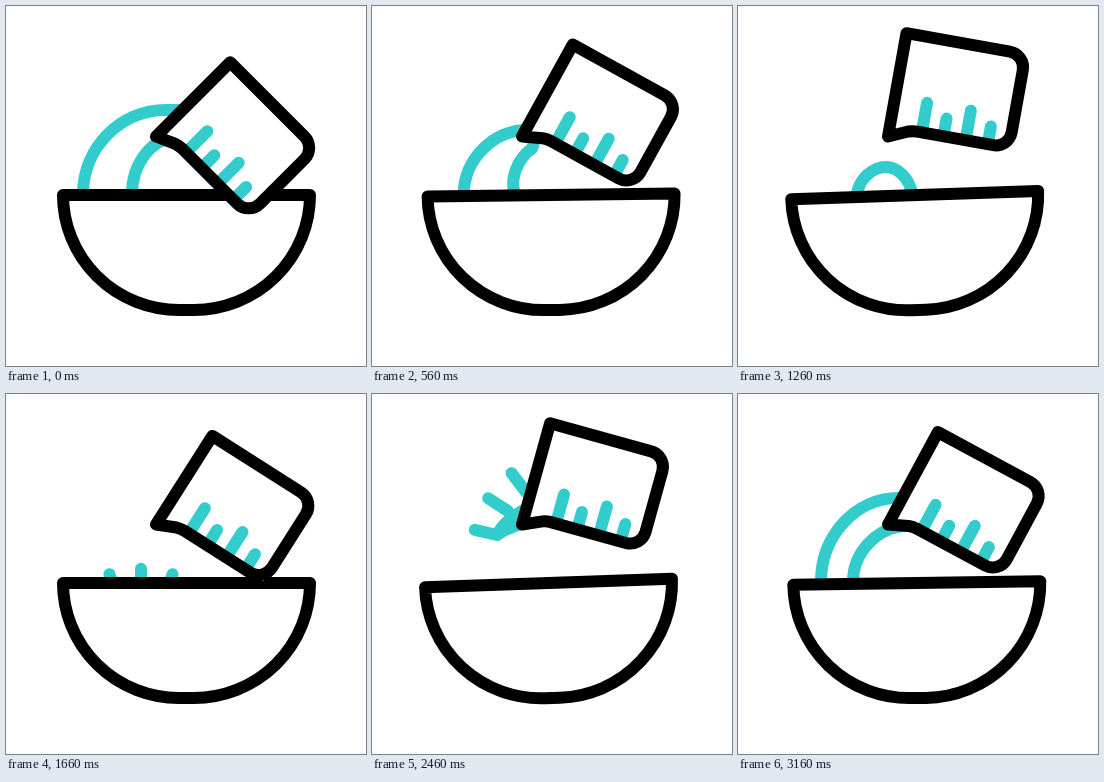
Recreate the animation shown at these times as an HTML page. Size 360x360 px, loop 3180 ms.

```html
<!DOCTYPE html>
<html lang="en">
<head>
<meta charset="utf-8">
<title>Pouring into a bowl</title>
<style>
  html, body { margin: 0; height: 100%; overflow: hidden; background: #fff; }
  svg { display: block; width: 100vw; height: 100vh; }
  path { fill: none; stroke-width: 12; stroke-linecap: round; stroke-linejoin: round; }
  .teal { stroke: #33cccc; }
  .ink { stroke: #000; }
  .solid { fill: #fff; }
</style>
</head>
<body>
<svg viewBox="0 0 360 360">
  <path id="fan" class="teal"/>
  <path id="flow" class="teal"/>
  <path id="bowl" class="ink solid" d="M57 189H304A116 115 0 0 1 188 304H173A116 115 0 0 1 57 189Z"/>
  <g id="jug">
    <path class="solid" d="M0 0V-105H121V-10H23Z"/>
    <path class="teal" d="M32.5 -16V-40M54.5 -16V-28M77 -16V-40M99.5 -16V-28"/>
    <path class="ink" d="M0 0V-105H105a16 16 0 0 1 16 16V-26a16 16 0 0 1 -16 16H28Q23 -10 19 -8.5Z"/>
  </g>
</svg>
<script>
const LOOP = 3180, STEP = 20;
const [fan, flow, bowl, jug] = ['fan', 'flow', 'bowl', 'jug'].map(id => document.getElementById(id));

// Progress of t from a to b, held at 0 and 1 outside.
const span = (t, a, b) => Math.min(1, Math.max(0, (t - a) / (b - a)));
const ease = (t, a, b) => { const p = span(t, a, b); return p * p * (3 - 2 * p); };
const mix = (a, b, k) => a.map((p, i) => p.map((v, j) => v + (b[i][j] - v) * k));

const jugTilt = t => 45 + 35 * ease(t, 200, 960) - 22.5 * ease(t, 1240, 1640)
  + 17 * ease(t, 1640, 2340) - 29.5 * ease(t, 2840, 3540);
const bowlLean = t => -2 * (ease(t, 200, 1100) - ease(t, 1200, 1640)
  + ease(t, 1700, 2400) - ease(t, 2840, 3420));

// Stream outline: outer foot, corner, crest, spout top, lip, corner, inner foot.
const stream = (outer, inner) =>
  [[outer, 188], [outer, 104], [160, 104], [174, 104], [167, 132], [inner, 135], [inner, 188]];
const crest = [148, 161];
const arch = [[119, 188], [123, 161], crest, crest, crest, [170, 161], [174, 188]];
const inside = Array(7).fill([165, 120]);
const spurt = [[126, 140], [130, 126], [156, 114], [160, 116], [156, 128], [140, 132], [126, 140]];

function drain(t) {
  const q = span(t, 200, 1230);
  const shape = mix(stream(77, 126), arch, q);
  const bulge = Math.sin(Math.PI * q);
  const [x, y] = shape[5];
  shape[5] = [x - 9 * bulge, y + 18 * bulge];
  const sink = 40 * span(t, 1260, 1560);
  return shape.map(p => [p[0], p[1] + sink]);
}

function pour(t) {
  const start = mix(inside, spurt, span(t, 2300, 2460));
  return mix(start, stream(83, 115), span(t, 2460, 2820));
}

// Rounded corner from a to b around c.
function bend(a, c, b) {
  const [h1, h2] = mix([a, b], [c, c], 0.55);
  return `C${h1} ${h2} ${b}`;
}

function flowPath(t) {
  const [foot, c1, top, spout, lip, c2, inner] = t < 2300 ? drain(t) : pour(t);
  return `M${foot}${bend(foot, c1, top)}L${spout}L${lip}${bend(lip, c2, inner)}`;
}

// Three rays 20 degrees apart; the tails catch up with the heads.
function fanPath(t, begin, x, y, axis) {
  const p = span(t, begin, begin + 660);
  if (p === 0 || p === 1) return '';
  const tail = 60 + 64 * p, head = 124 - 44 * (1 - p) ** 2;
  return [-20, 0, 20].map(turn => {
    const a = (axis + turn) * Math.PI / 180;
    const at = r => [x + r * Math.cos(a), y + r * Math.sin(a)];
    return `M${at(tail)}L${at(head)}`;
  }).join('');
}

function draw(t) {
  fan.setAttribute('d', fanPath(t, 1560, 135, 267, -90) + fanPath(t, 2300, 199, 158, -147));
  flow.setAttribute('d', flowPath(t));
  bowl.setAttribute('transform', `rotate(${bowlLean(t)} 180 304)`);
  jug.setAttribute('transform', `translate(150 130.5) rotate(${90 - jugTilt(t)})`);
}

const start = performance.now();
function tick() {
  const t = (performance.now() - start) % LOOP;
  draw(t - t % STEP);
  requestAnimationFrame(tick);
}
tick();
</script>
</body>
</html>
```
